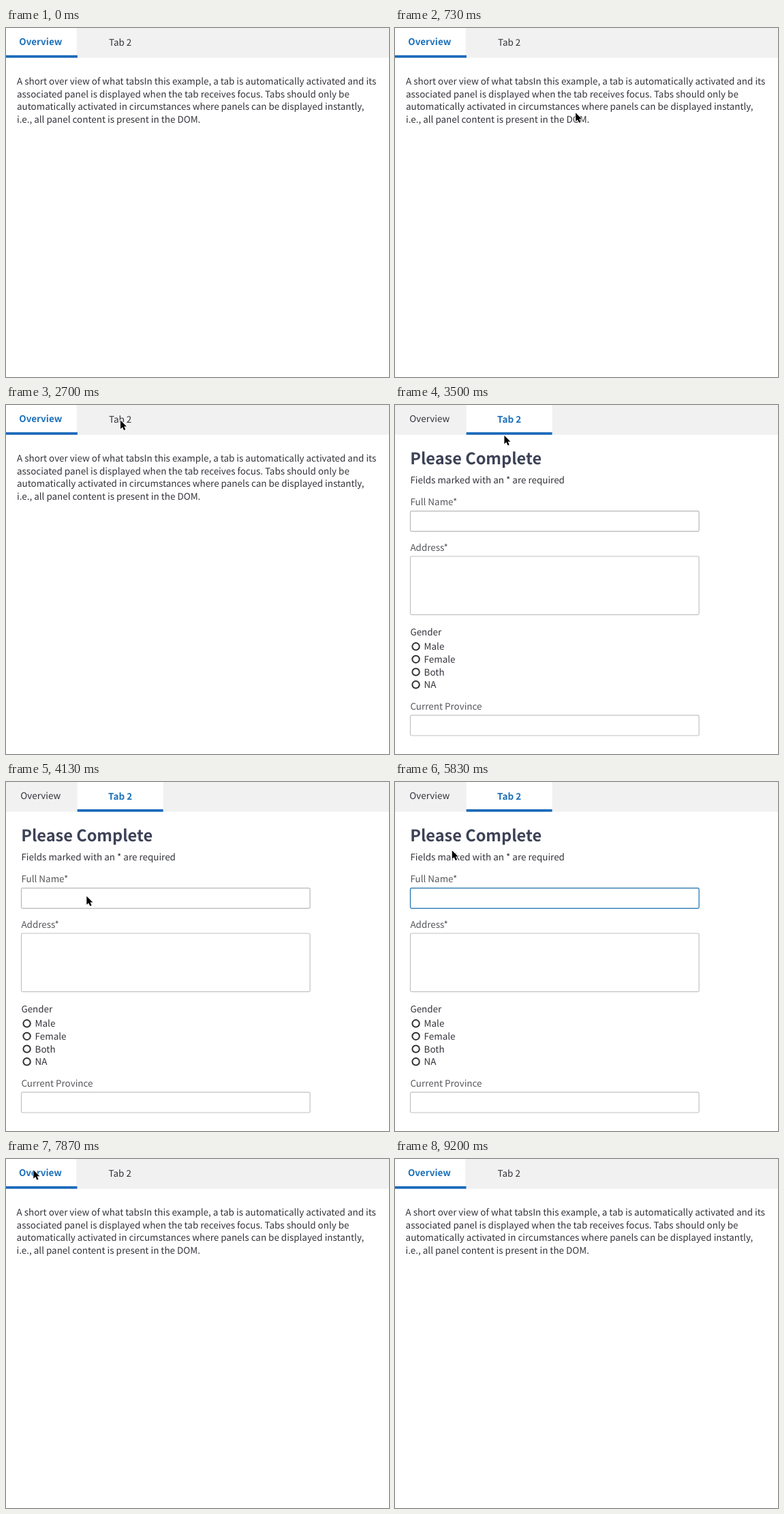
Write an HTML page that moves like this. It is 562x512 px and loops after 9.36 s.

```html
<!DOCTYPE html>
<html lang="en">
<head>
<meta charset="utf-8">
<title>Tabs</title>
<style>
  html, body { margin: 0; width: 100%; height: 100%; overflow: hidden; background: #fff; }
  svg { display: block; width: 562px; height: 512px; }
  text {
    font: 13.45px "Noto Sans CJK JP", "Noto Sans CJK SC", "Noto Sans CJK KR", "Noto Sans", sans-serif;
    fill: #32333a;
    text-rendering: geometricPrecision;
  }
  .tab text { text-anchor: middle; }
  .tab rect { display: none; }
  .tab.active rect { display: inline; }
  .tab.active text { font-weight: 700; fill: #1b70bb; }
  .label { fill: #55565a; }
  .title { font-size: 23.54px; font-weight: 700; fill: #3c4156; }
  .field { fill: #fff; stroke: #c2c2c2; stroke-width: 1.2; }
  circle { fill: #fff; stroke: #333; stroke-width: 2; }
  #cursor { fill: #000; stroke: #fff; stroke-width: 1.6; stroke-linejoin: round; paint-order: stroke; }
</style>
</head>
<body>
<svg viewBox="0 0 562 512">
  <rect width="562" height="43.7" fill="#f1f1f1"/>
  <g id="page">
    <g class="tab">
      <rect x="-2" width="105.6" height="43.7" fill="#fff"/>
      <rect x="-2" y="40" width="106.9" height="3.7" fill="#1b6abb"/>
      <text x="50.8" y="25.1">Overview</text>
    </g>
    <g class="tab">
      <rect x="104.6" width="126" height="43.7" fill="#fff"/>
      <rect x="104.6" y="40" width="126" height="3.7" fill="#1b6abb"/>
      <text x="167.6" y="25.7">Tab 2</text>
    </g>
    <g class="panel">
      <text x="16" y="83">A short over view of what tabsIn this example, a tab is automatically activated and its</text>
      <text x="16" y="101.7">associated panel is displayed when the tab receives focus. Tabs should only be</text>
      <text x="16" y="120.4">automatically activated in circumstances where panels can be displayed instantly,</text>
      <text x="16" y="139.1">i.e., all panel content is present in the DOM.</text>
    </g>
    <g class="panel">
      <text class="title" x="22.2" y="86.8">Please Complete</text>
      <text x="22.4" y="115">Fields marked with an * are required</text>
      <text class="label" x="22.4" y="147.2">Full Name*</text>
      <rect id="fullName" class="field" x="22.5" y="155.6" width="423.6" height="29.7" rx="1.8"/>
      <text class="label" x="22.4" y="213.6">Address*</text>
      <rect class="field" x="22.5" y="222" width="423.6" height="85.6" rx="1.8"/>
      <text x="22.4" y="337.6">Gender</text>
      <g id="radios"></g>
      <text class="label" x="22.4" y="446.7">Current Province</text>
      <rect class="field" x="22.5" y="455.2" width="423.6" height="29.8" rx="1.8"/>
    </g>
  </g>
  <path id="cursor" d="M0 0V12.6L2.9 9.9L5.1 14.6L7.3 13.6L5.2 9.1H9Z"/>
</svg>
<script>
  const LOOP = 9360, OPEN_FORM = 2760, FOCUS = 4640, OPEN_OVERVIEW = 6860, FADE = 300;

  // Each cursor move: start, end, from x, y, to x, y
  const moves = [
    [170, 1100, 562, 426, 172, 30],
    [1130, 1330, 172, 30, 169.5, 27],
    [1470, 1770, 169.5, 27, 168, 22.5],
    [3430, 4130, 168, 22.5, 118.3, 167.5],
    [5570, 6400, 118.3, 167.5, 40.3, 16.2]
  ];

  const find = id => document.getElementById(id);
  const tabs = document.querySelectorAll('.tab');
  const panels = document.querySelectorAll('.panel');
  const page = find('page'), fullName = find('fullName'), cursor = find('cursor');
  const ramp = (t, start, end) => Math.min(1, Math.max(0, (t - start) / (end - start)));
  const easeOut = p => 1 - (1 - p) ** 1.55;
  const mix = (a, b, p) => a + (b - a) * p;

  find('radios').innerHTML = ['Male', 'Female', 'Both', 'NA'].map((name, i) => {
    const y = 354.3 + i * 18.67;
    return `<circle cx="30.6" cy="${y}" r="5.2"/><text x="42.6" y="${y + 4.9}">${name}</text>`;
  }).join('');

  function render(t) {
    const active = t >= OPEN_FORM && t < OPEN_OVERVIEW ? 1 : 0;
    const fade = active ? ramp(t, OPEN_FORM, OPEN_FORM + FADE)
      : t >= OPEN_OVERVIEW ? ramp(t, OPEN_OVERVIEW, OPEN_OVERVIEW + FADE) : 1;
    tabs.forEach((tab, i) => tab.classList.toggle('active', i === active));
    panels.forEach((panel, i) => panel.style.opacity = i === active ? fade : 0);
    page.setAttribute('transform', `translate(${t >= OPEN_OVERVIEW ? -0.4 : 0} 0)`);

    const focus = ramp(t, FOCUS - 30, FOCUS + 90);
    const [r, g, b] = [[184, 27], [184, 112], [184, 175]].map(([from, to]) => Math.round(mix(from, to, focus)));
    fullName.style.stroke = `rgb(${r},${g},${b})`;

    const [start, end, x0, y0, x1, y1] = moves.findLast(m => t >= m[0]) || moves[0];
    const p = easeOut(ramp(t, start, end));
    cursor.setAttribute('transform', `translate(${mix(x0, x1, p)} ${mix(y0, y1, p)})`);
    cursor.style.opacity = t < moves[0][0] ? 0 : 1 - ramp(t, 7870, 8200);
  }

  const begin = performance.now();
  function tick() {
    render((performance.now() - begin) % LOOP);
    requestAnimationFrame(tick);
  }
  tick();
</script>
</body>
</html>
```
